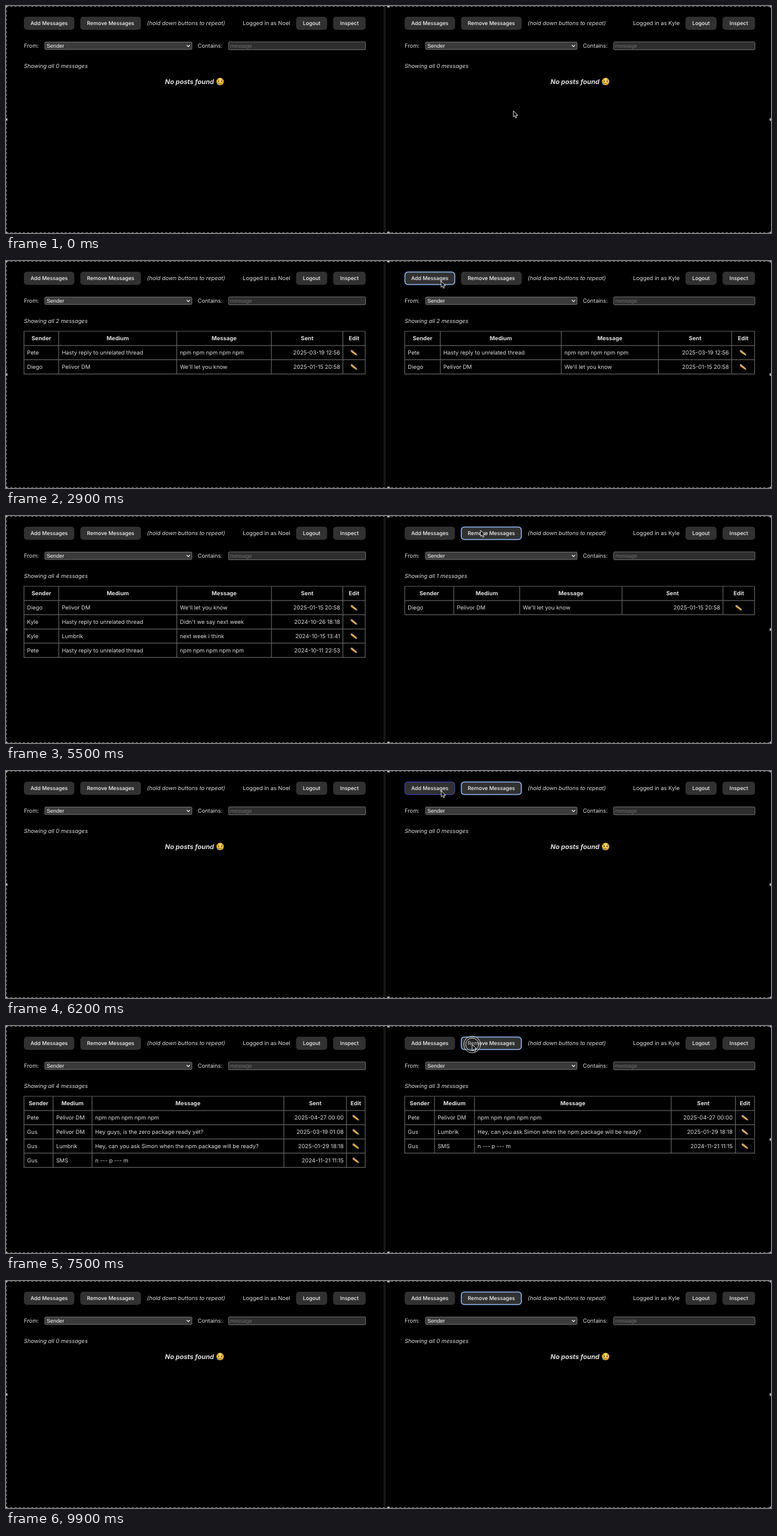
An HTML page for the animation above (10000 ms loop, 1280 by 381 pixels).

```html
<!DOCTYPE html>
<html lang="en">
<head>
<meta charset="utf-8">
<title>Synced messages</title>
<style>
  html, body { margin: 0; width: 100%; height: 100%; overflow: hidden; background: #000; }
  svg { display: block; width: 1280px; height: 381px; }
  text { font: 9.3px Inter, sans-serif; fill: #dedede; text-rendering: geometricPrecision; white-space: pre; }
  .italic { font-style: italic; }
  .head { font-size: 9.4px; font-weight: 700; }
  .empty { font-size: 11px; font-weight: 700; font-style: italic; }
  .button { font-size: 8.8px; font-weight: 500; fill: #f4f4f4; }
  .field { font-family: "Liberation Sans", Arial, sans-serif; font-size: 9.1px; fill: #fff; }
  .hint { fill: #6c6c6c; }
  .end { text-anchor: end; }
  .mid { text-anchor: middle; }
</style>
</head>
<body>
<svg viewBox="0 0 1280 381">
  <defs>
    <g id="pencil">
      <path d="M-5.5-3.9Q-4.2-5.4-3-4.4L-1.6-3.2-4.1-.8-5.3-2Q-6-2.9-5.5-3.9Z" fill="#d98a94"/>
      <path d="M-2.5-4-1-2.7-3.6-.3-4.8-1.5Z" fill="#9aa0a4"/>
      <path d="M-1.5-3.1 4.3 1.8 2.2 3.8-3.9-.6Z" fill="#d9982b"/>
      <path d="M-2.6-1.9 3.2 2.8" stroke="#f3c04e" stroke-width="1.1"/>
      <path d="M4.3 1.8 5.6 4.8 2.2 3.8Z" fill="#d8b78f"/>
      <path d="M5 3.3 5.7 5 4 4.4Z" fill="#333"/>
    </g>
    <radialGradient id="skin" cy=".35">
      <stop offset=".3" stop-color="#ffe06a"/><stop offset="1" stop-color="#efa51f"/>
    </radialGradient>
    <g id="sad">
      <circle r="6.2" fill="url(#skin)"/>
      <ellipse cx="-2.3" cy="-.6" rx=".9" ry="1.2" fill="#4a2b10"/>
      <ellipse cx="2.3" cy="-.6" rx=".9" ry="1.2" fill="#4a2b10"/>
      <path d="M-4.4-2.6Q-2.7-3.1-1.9-4M4.4-2.6Q2.7-3.1 1.9-4M-2 3.8Q0 2 2 3.8" fill="none" stroke="#6b4012" stroke-width=".8"/>
      <path d="M-3.4 1.2Q-5.6 4-4.7 5.2-3.4 6.4-2.2 5.1-1.7 3.8-3.4 1.2Z" fill="#4fa9ef"/>
    </g>
  </defs>
  <g id="frame"></g>
  <g id="panes"></g>
  <g id="pointer">
    <g id="press" stroke="#d8d8d8" fill="none">
      <circle r="14" fill="#000" fill-opacity=".25"/><circle r="10.8"/>
    </g>
    <path d="M0 0V10.2L2.3 8 3.9 11.7 5.7 10.9 4.1 7.3H7.3Z" fill="#000" stroke="#fff" stroke-width=".9" stroke-linejoin="round"/>
  </g>
</svg>
<script>
const LOOP = 10000, STEP = 100, SYNC_DELAY = 400;
const TOP = 118, ROW = 23.86;
const $ = id => document.getElementById(id);

const DM = "Pelivor DM", REPLY = "Hasty reply to unrelated thread", CHAT = "Lumbrik";
const NPM = "npm npm npm npm npm", LATER = "We'll let you know";

// sender, medium, message, sent, time added, time removed
const messages = [
  ["Pete", DM, NPM, "2025-04-27 00:00", 6850, 8600],
  ["Pete", REPLY, NPM, "2025-03-19 12:56", 1050, 4900],
  ["Gus", DM, "Hey guys, is the zero package ready yet?", "2025-03-19 01:08", 6700, 7400],
  ["Gus", CHAT, "Hey, can you ask Simon when the npm package will be ready?", "2025-01-29 18:18", 6550, 7600],
  ["Diego", DM, LATER, "2025-01-15 20:58", 2200, 5750],
  ["Gus", "SMS", "n --- p --- m", "2024-11-21 11:15", 6400, 7800],
  ["Kyle", REPLY, "Didn't we say next week", "2024-10-26 18:18", 3050, 5140],
  ["Kyle", CHAT, "next week i think", "2024-10-15 13:41", 3180, 5260],
  ["Pete", REPLY, NPM, "2024-10-11 22:53", 3310, 5380],
  ["Trevor", DM, LATER, "2024-10-01 17:21", 3440, 5020],
];
const headings = ["Sender", "Medium", "Message", "Sent", "Edit"];

const panes = [
  { left: 30, right: 602, select: 246, user: "Noel", empty: 266, delay: SYNC_DELAY },
  { left: 667, right: 1253.5, select: 253.5, user: "Kyle", empty: 911, delay: 0, active: true },
];

// time, x, y
const path = [
  [0, 849, 176], [800, 728, 34], [3900, 728, 34], [4500, 794, 24], [5950, 794, 24],
  [6250, 723, 34], [6950, 723, 34], [7250, 780, 31], [8700, 780, 31], [9000, 792, -18],
];
const presses = [[900, 1500], [1900, 2700], [2950, 3500], [4800, 5400], [5700, 5900],
  [6300, 6950], [7300, 7800], [8500, 8650]];
const focusChanges = [[900, "Add Messages"], [4800, "Remove Messages"], [6300, "Add Messages"], [7300, "Remove Messages"]];

const text = (x, y, str, cls = "") => `<text x="${x}" y="${y}" class="${cls}">${str}</text>`;
const rect = (x, y, w, h, attrs) => `<rect x="${x}" y="${y}" width="${w}" height="${h}" ${attrs}/>`;
const use = (id, x, y) => `<use href="#${id}" x="${x}" y="${y}"/>`;

const pen = document.createElement("canvas").getContext("2d");
function textWidth(str, bold) {
  pen.font = bold ? "700 94px Inter, sans-serif" : "93px Inter, sans-serif";
  return pen.measureText(str).width / 10;
}

function button(x, w, label, pointer, focus) {
  const hover = pointer && pointer.x >= x && pointer.x <= x + w && pointer.y >= 18 && pointer.y <= 40;
  const border = (color, width) =>
    rect(x + .5, 18.5, w - 1, 21, `rx="5" fill="none" stroke="${color}" stroke-width="${width}"`);
  return rect(x, 18, w, 22, 'rx="5" fill="#313131"')
    + (focus === label ? border("#8fbaf8", 1.5) : hover ? border("#4448d8", 1) : "")
    + text(x + w / 2, 32.2, label, "button mid");
}

function toolbar({ left, right, select, user, active }, pointer, focus) {
  const target = active && pointer, current = active && focus;
  const selectEnd = left + 35 + select, input = selectEnd + 61.3;
  const box = 'rx="1.5" stroke="#7c7c7c" stroke-width=".9"';
  return button(left, 84.3, "Add Messages", target, current)
    + button(left + 94.3, 101.5, "Remove Messages", target, current)
    + text(left + 206, 32.2, "(hold down buttons to repeat)", "italic")
    + text(right - 126.4, 32.2, "Logged in as " + user, "end")
    + button(right - 116.6, 52, "Logout") + button(right - 54.6, 54.4, "Inspect")
    + text(left, 70.2, "From:")
    + rect(left + 35, 60.5, select, 12.5, `${box} fill="#3b3b3b"`)
    + text(left + 38, 70, "Sender", "field")
    + `<path d="M${selectEnd - 8.6} 65.6l2.6 2.6 2.6-2.6" fill="none" stroke="#fff" stroke-width="1.3"/>`
    + text(selectEnd + 9.7, 70.2, "Contains:")
    + rect(input, 60.2, right - input - .4, 13.2, `${box} fill="#2d2d2d"`)
    + text(input + 2.3, 70, "message", "field hint");
}

// Columns share the table width in proportion to their widest content.
function columnEdges(rows, left, right) {
  const widths = headings.map((h, i) => 10 + Math.max(textWidth(h, true),
    ...rows.map(r => i < 4 ? textWidth(r[i]) : 0)));
  const scale = (right - left) / widths.reduce((a, b) => a + b);
  const edges = [left];
  widths.forEach((w, i) => edges.push(edges[i] + w * scale));
  return edges;
}

function table(rows, left, right) {
  const edges = columnEdges(rows, left, right);
  const bottom = TOP + ROW * (rows.length + 1);
  const centre = i => (edges[i] + edges[i + 1]) / 2;
  let lines = "", out = "";
  edges.forEach(x => lines += `M${x} ${TOP}V${bottom}`);
  for (let i = 0; i <= rows.length + 1; i++) lines += `M${left - .6} ${TOP + i * ROW}H${right + .6}`;
  headings.forEach((h, i) => out += text(centre(i), 133.4, h, "head mid"));
  rows.forEach((row, k) => {
    const y = TOP + ROW * (k + 1.5);
    for (let i = 0; i < 3; i++) out += text(edges[i] + 5.2, y + 3.4, row[i]);
    out += text(edges[4] - 4.6, y + 3.4, row[3], "end") + use("pencil", centre(4), y + .2);
  });
  return `<path d="${lines}" stroke="#626262" stroke-width="1.2"/>` + out;
}

function pane(spec, t, pointer, focus) {
  const { left, right, delay, empty } = spec;
  const rows = messages.filter(m => t - delay >= m[4] && t - delay < m[5]);
  return toolbar(spec, pointer, focus)
    + text(left, 104, `Showing all ${rows.length} messages`, "italic")
    + (rows.length ? table(rows, left + .1, right - 1)
      : text(empty, 130.8, "No posts found", "empty") + use("sad", empty + 92.3, 126.8));
}

function pointerAt(t) {
  const i = path.findIndex(p => p[0] > t);
  if (i < 0) return { x: path.at(-1)[1], y: path.at(-1)[2] };
  const [t0, x0, y0] = path[i - 1], [t1, x1, y1] = path[i];
  const u = (t - t0) / (t1 - t0), k = u * u * (3 - 2 * u);
  return { x: x0 + (x1 - x0) * k, y: y0 + (y1 - y0) * k };
}

function drawFrame() {
  let out = '<path d="M0 .5H1280M.5 0V381M0 380.5H1280" fill="none" stroke="#858585" stroke-dasharray="4 3"/>'
    + '<path d="M632.5 1V380M634.5 1V380" stroke="#2b2b2b"/>';
  for (const x of [0, 640, 1280]) for (const y of [0, 190.5, 381])
    if (x !== 640 || y !== 190.5) out += `<circle cx="${x}" cy="${y}" r="2.6" fill="#b5b5b5" stroke="#555" stroke-width=".6"/>`;
  $("frame").innerHTML = out;
}

function render(t) {
  const pointer = pointerAt(t);
  const focus = focusChanges.filter(f => f[0] <= t).at(-1)?.[1];
  $("panes").innerHTML = panes.map(p => pane(p, t, pointer, focus)).join("");
  $("pointer").setAttribute("transform", `translate(${pointer.x} ${pointer.y})`);
  $("press").setAttribute("visibility", presses.some(([a, b]) => t >= a && t < b) ? "visible" : "hidden");
}

const start = performance.now();
let shown = -1;
function tick() {
  const t = Math.floor((performance.now() - start) % LOOP / STEP) * STEP;
  if (t !== shown) render(shown = t);
  requestAnimationFrame(tick);
}
drawFrame();
tick();
</script>
</body>
</html>
```
